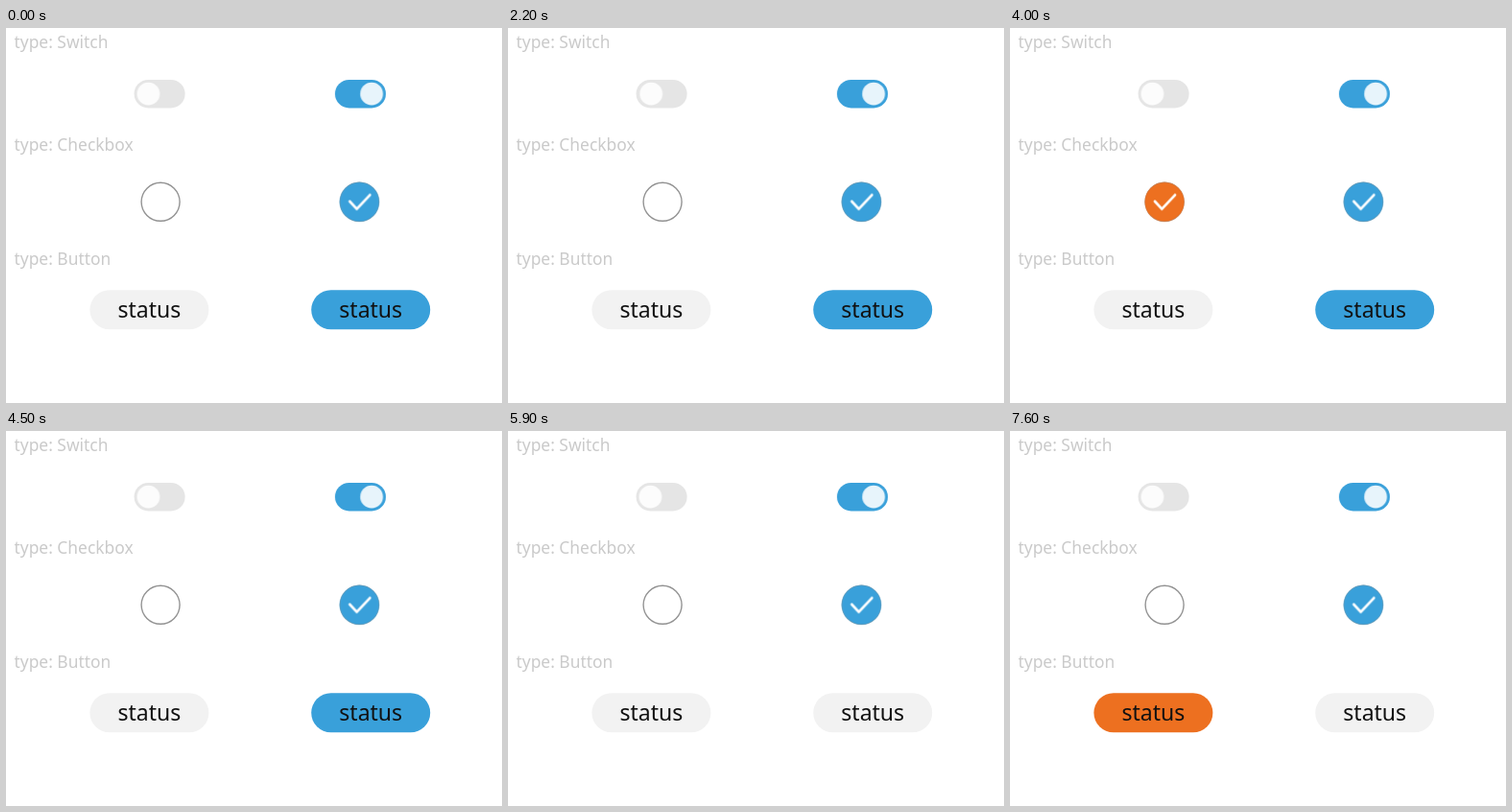
An HTML page that plays this animation: 517 px wide and 391 px high, repeating every 7.9 s.

```html
<!DOCTYPE html>
<html lang="en">
<head>
<meta charset="utf-8">
<title>Toggle types</title>
<style>
  :root { --orange: #ed7020; --blue: #39a0da; --off: #e5e5e5; --plain: #f2f2f2; }
  html, body { margin: 0; width: 100%; height: 100%; overflow: hidden; background: #fff; }
  svg { display: block; width: 517px; height: 391px; }
  text { font-family: "Noto Sans", "Open Sans", sans-serif; }
  .label { font-size: 17.4px; fill: #cacaca; }
  .caption { font-size: 23px; fill: #111; text-anchor: middle; }
  .thumb { fill: #fff; fill-opacity: .88; }
  .ring { fill: #fff; stroke: #929292; stroke-width: 1.4; }
  .tick { fill: none; stroke: #fff; stroke-width: 2.7; stroke-linecap: round; stroke-linejoin: round; }

  /* every state change is a hard cut in one 7.9 s loop */
  .a { animation: 7.9s step-end infinite; }
  .track-l { fill: var(--off); animation-name: track-l; }
  .thumb-l { animation-name: thumb-l; }
  .track-r { fill: var(--blue); animation-name: track-r; }
  .thumb-r { animation-name: thumb-r; }
  .check-l { animation-name: check-l; }
  .check-r { animation-name: check-r; }
  .button-l { fill: var(--plain); animation-name: button-l; }
  .button-r { fill: var(--blue); animation-name: button-r; }

  @keyframes track-l {
    0%, 27.848% { fill: var(--off); }
    21.518% { fill: var(--orange); }
  }
  @keyframes thumb-l {
    0%, 32.911% { transform: translateX(0); }
    21.518% { transform: translateX(23.6px); }
    27.848% { transform: translateX(.8px); }
  }
  @keyframes track-r {
    0%, 44.303% { fill: var(--blue); }
    32.911% { fill: var(--off); }
    39.240% { fill: #c8ccd0; }
  }
  @keyframes thumb-r {
    0%, 44.303% { transform: translateX(23.4px); }
    32.911% { transform: translateX(0); }
    39.240% { transform: translateX(1.8px); }
  }
  @keyframes check-l {
    0%, 56.962% { opacity: 0; }
    50.632% { opacity: 1; }
  }
  @keyframes check-r {
    0%, 68.354% { opacity: 1; }
    62.025% { opacity: 0; }
  }
  @keyframes button-l {
    0% { fill: var(--plain); }
    84.810% { fill: var(--orange); }
  }
  @keyframes button-r {
    0% { fill: var(--blue); }
    74.683% { fill: var(--plain); }
  }
</style>
</head>
<body>
<svg viewBox="0 0 517 391">
  <defs>
    <rect id="track" width="53" height="29.4" rx="14.7"/>
    <circle id="thumb" cx="14.8" cy="14.7" r="11.9"/>
    <path id="tick" d="M-10.1 -.5L-2.8 7.4L10.9 -7.2"/>
    <rect id="pill" width="124" height="41" rx="20.5"/>
  </defs>

  <text class="label" x="8.5" y="21">type: Switch</text>
  <text class="label" x="8.5" y="128">type: Checkbox</text>
  <text class="label" x="8.5" y="247">type: Button</text>

  <g transform="translate(133.6 54)">
    <use href="#track" class="a track-l"/>
    <use href="#thumb" class="a thumb thumb-l"/>
  </g>
  <g transform="translate(342.9 54)">
    <use href="#track" class="a track-r"/>
    <use href="#thumb" class="a thumb thumb-r"/>
  </g>

  <g transform="translate(161.1 181.3)">
    <circle class="ring" r="20"/>
    <g class="a check-l">
      <circle r="20.6" fill="var(--orange)"/>
      <use href="#tick" class="tick"/>
    </g>
  </g>
  <g transform="translate(368.4 181.3)">
    <circle class="ring" r="20"/>
    <g class="a check-r">
      <circle r="20.6" fill="var(--blue)"/>
      <use href="#tick" class="tick"/>
    </g>
  </g>

  <g transform="translate(87.4 273.3)">
    <use href="#pill" class="a button-l"/>
    <text class="caption" x="62" y="28.7">status</text>
  </g>
  <g transform="translate(318.2 273.3)">
    <use href="#pill" class="a button-r"/>
    <text class="caption" x="62" y="28.7">status</text>
  </g>
</svg>
</body>
</html>
```
